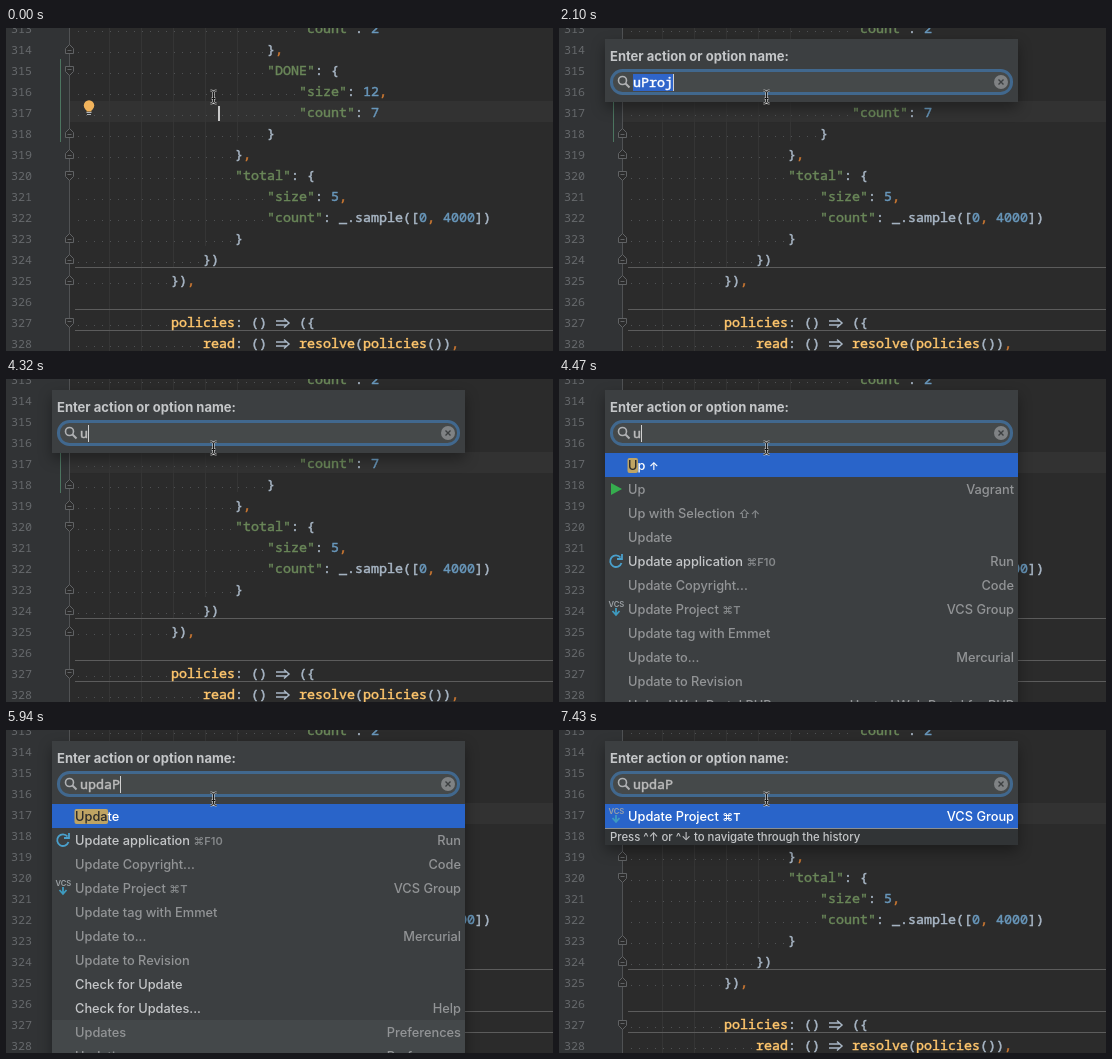
Animation of 547x323 px, one loop 8000 ms. Source, as an HTML page:

```html
<!DOCTYPE html>
<html lang="en">
<head>
<meta charset="utf-8">
<title>Find action</title>
<style>
html, body { margin: 0; width: 100%; height: 100%; overflow: hidden; background: #2b2b2b; }
svg { display: block; width: 547px; height: 323px; }
text { white-space: pre; font: 500 12.8px Inter, "Open Sans", sans-serif; fill: #c4c6c8; }
.code {
  font: 13.333px "Noto Sans Mono", "DejaVu Sans Mono", monospace;
  color: #a9b7c6; fill: currentColor; stroke: currentColor; stroke-width: .45px;
}
.code tspan { fill: currentColor; stroke: currentColor; }
.num { font: 11.67px "Noto Sans Mono", "DejaVu Sans Mono", monospace; fill: #66696c; }
.str { color: #6a8759; }
.val { color: #6897bb; }
.comma { color: #cc7832; }
.fn { color: #ffc66d; }
.title { font-size: 13px; font-weight: 700; }
.hint { font-size: 11.35px; }
.off { fill: #929496; }
.key { fill: #85888a; font-size: 11px; font-weight: 600; }
.sel, .sel .key { fill: #fff; }
.vcs { font-size: 7.6px; font-weight: 600; fill: #9da2a6; }
.popup { filter: drop-shadow(0 6px 7px rgba(0, 0, 0, .35)); }
</style>
</head>
<body>
<svg viewBox="0 0 547 323"><g id="editor"></g><g id="overlay"></g></svg>
<script>
const LOOP = 8000, COL = 8, CODE_X = 69, ROW = 21;
const $ = id => document.getElementById(id);
const rect = (x, y, w, h, fill, extra = '') =>
  `<rect x="${x}" y="${y}" width="${w}" height="${h}" fill="${fill}" ${extra}/>`;
const path = (d, stroke, width = 1, fill = 'none') =>
  `<path d="${d}" stroke="${stroke}" stroke-width="${width}" fill="${fill}"/>`;
const text = (x, y, s, cls = '', extra = '') =>
  `<text x="${x}" y="${y}" class="${cls}" ${extra}>${s}</text>`;
const span = (cls, s) => `<tspan class="${cls}">${s}</tspan>`;

// --- editor -------------------------------------------------------------
// [indent column, code, fold mark]; the first line is number 313
const lines = [
  [28, '"count": 2'],
  [24, '},', 'end'],
  [24, '"DONE": {', 'start'],
  [28, '"size": 12,'],
  [28, '"count": 7'],
  [24, '}', 'end'],
  [20, '},', 'end'],
  [20, '"total": {', 'start'],
  [24, '"size": 5,'],
  [24, '"count": _.sample([0, 4000])'],
  [20, '}', 'end'],
  [16, '})', 'end'],
  [12, '}),', 'end'],
  [0, ''],
  [12, 'policies: () => ({', 'start'],
  [16, 'read: () => resolve(policies()),'],
];

function paint(code) {
  return code.replace(/"\w+"|\d+|,|policies|read|resolve|=>/g, s =>
    s === '=>' ? '  ' :
    span(s[0] === '"' ? 'str' : s === ',' ? 'comma' : /\d/.test(s) ? 'val' : 'fn', s));
}

function foldMark(y, kind) {
  const d = kind === 'end' ? -1 : 1;
  return path(`M59.5 ${y + .5 - 4 * d}h8v${5 * d}l-4 ${4 * d}l-4 ${-4 * d}zM61.5 ${y + .5 - d}h4`, '#606264', 1, '#2b2b2b');
}

function drawEditor() {
  let out = rect(0, 0, 64, 323, '#313335') + rect(64, 73, 483, 21, '#323232');
  out += path('M103.5 0V323M135.5 0V323M167.5 0V239M199.5 0V218M231.5 0V113', '#353535');
  out += path('M63.5 0V323', '#505254') + rect(54, 31, 1, 83, '#4c7560');
  out += path('M69 239.5H547M69 281.5H547M69 302.5H547', '#5c5c5c');
  lines.forEach(([indent, code, fold], i) => {
    const mid = ROW * i, base = mid + 5, x = CODE_X + indent * COL;
    out += text(5, base, 313 + i, 'num');
    if (indent) out += `<path d="M${CODE_X + 3} ${mid + 3.5}H${x}" stroke="#505254" stroke-dasharray="1 7"/>`;
    out += text(x, base, paint(code), 'code');
    const arrow = code.indexOf('=>');
    if (arrow > 0) {
      const ax = x + arrow * COL;
      out += path(`M${ax + 1} ${mid - 1}h11M${ax + 1} ${mid + 3}h11M${ax + 9} ${mid - 3.5}l5 4.5l-5 4.5`, '#a9b7c6', 1.5);
    }
    if (fold) out += foldMark(mid, fold);
  });
  $('editor').innerHTML = out;
}

function bulb() {
  return '<circle cx="83" cy="77.5" r="5.2" fill="#f2b45c"/>' +
    rect(80.5, 81, 5, 2.5, '#f2b45c') + rect(80.5, 84, 5, 1, '#b0b4b8') + rect(81, 86, 4, 1, '#b0b4b8');
}

// --- popup --------------------------------------------------------------
const icons = {
  run: y => path(`M52 ${y - 6}l11 6l-11 6z`, 'none', 0, '#35ad4e'),
  reload: y => path(`M61.5 ${y - 3.5}A5.8 5.8 0 1 0 62.5 ${y + 2}M63 ${y - 7}v5h-5`, '#4aa0cc', 1.8),
  vcs: y => text(49.5, y - 2, 'VCS', 'vcs') + path(`M57 ${y - 1}v6M53.5 ${y + 2}l3.5 4l3.5 -4`, '#3e9bc0', 1.8),
};

const item = (name, group = '', opt = {}) => ({ name, group, ...opt });
const on = { on: true };
const project = item('Update Project', 'VCS Group', { icon: 'vcs', key: '⌘T' });
const common = [
  item('Update application', 'Run', { icon: 'reload', key: '⌘F10', on: true }),
  item('Update Copyright...', 'Code'),
  project,
  item('Update tag with Emmet'),
  item('Update to...', 'Mercurial'),
  item('Update to Revision'),
];
const results = {
  none: [],
  short: [project],
  up: [
    item('Up', '', { key: '↑' }),
    item('Up', 'Vagrant', { icon: 'run' }),
    item('Up with Selection', '', { key: '⇧↑' }),
    item('Update'),
    ...common,
    item('Upload Web Portal PHP app...', 'Hosted Web Portal for PHP'),
  ],
  update: [
    item('Update'),
    ...common,
    item('Check for Update', '', on),
    item('Check for Updates...', 'Help', on),
    item('Updates', 'Preferences', { setting: true }),
    item('Updating...', 'Preferences', { setting: true }),
  ],
};

const pen = document.createElement('canvas').getContext('2d');
function widthOf(s) {
  pen.font = '500 12.8px Inter, "Open Sans", sans-serif';
  return pen.measureText(s).width;
}

function drawItem(it, i, match) {
  const y = 86 + 24 * i, first = i === 0;
  const cls = first ? 'sel' : it.on ? '' : 'off';
  let out = '', name = it.name;
  if (first) out += rect(46, 74, 413, 24, '#2964c9');
  else if (it.setting) out += rect(46, y - 12, 413, 24, '#44484a');
  if (first && match) {
    const hit = name.slice(0, match);
    out += rect(68.5, 79, widthOf(hit) + 1, 15, '#bfa463', 'rx="2"');
    name = `<tspan fill="#2b2b2b">${hit}</tspan>${name.slice(match)}`;
  }
  if (it.icon) out += icons[it.icon](y);
  const key = it.key ? `<tspan class="key" dx="3.5">${it.key}</tspan>` : '';
  out += text(69, y + 5, name + key, cls);
  return out + text(455, y + 5, it.group, first ? 'sel' : 'off', 'text-anchor="end"');
}

function drawField(query, selected, caret) {
  let out = rect(52.5, 42.5, 400, 23, '#45494a', 'rx="11" stroke="#41688e" stroke-width="3"');
  out += '<circle cx="63.5" cy="52.5" r="4" fill="none" stroke="#afb1b3" stroke-width="1.6"/>' +
    path('M66.5 55.5l4 4', '#afb1b3', 2);
  if (selected) out += rect(74, 46, query.length * COL, 17, '#2f65ca');
  out += text(74, 59, query, 'code', `style="color:${selected ? '#fff' : '#bbb'}"`);
  if (query) out += '<circle cx="442" cy="54" r="7" fill="#7f8284"/>' + path('M439.5 51.5l5 5m0 -5l-5 5', '#3c3f41', 1.4);
  if (caret) out += rect(74 + query.length * COL, 46, 1, 17, '#d0d0d0');
  return out;
}

function drawPopup(query, list, match, caret, selected) {
  const rows = results[list], short = list === 'short';
  const height = short ? 104 : rows.length ? 330 : 63;
  let out = `<g class="popup">${rect(46, 11, 413, height, '#3c3f41')}</g>`;
  out += text(51, 33, 'Enter action or option name:', 'title') + drawField(query, selected, caret);
  if (short) out += rect(46, 98, 413, 17, '#313436') + rect(46, 98, 413, 1, '#8c8f91') +
    text(51, 111, 'Press ^↑ or ^↓ to navigate through the history', 'hint');
  return out + rows.map((it, i) => drawItem(it, i, match)).join('');
}

// --- pointer ------------------------------------------------------------
function pointer(arrow) {
  if (arrow) return path('M206.5 67v15.5l3.7 -3.4l2.6 6l2.4 -1l-2.6 -5.9h4.4z', '#fff', 1.1, '#000');
  const beam = 'M204.5 62.5q3 0 3 2.5v8q0 2.5 -3 2.5M210.5 62.5q-3 0 -3 2.5v8q0 2.5 3 2.5M205.5 70.5h4';
  return path(beam, '#d4d4d4', 2.2) + path(beam, '#161616', 1);
}

// --- timeline -----------------------------------------------------------
const OPEN = 2100, TYPE = 3430;
const queries = [[OPEN, 'uProj'], [TYPE, ''], [4320, 'u'], [4610, 'up'], [5050, 'upd'], [5200, 'upda'], [5940, 'updaP']];
// [time, result list, highlighted letters]
const lists = [
  [OPEN, 'none', 0], [2250, 'short', 0], [TYPE, 'none', 0], [4470, 'up', 1],
  [4760, 'up', 2], [5050, 'update', 3], [5200, 'update', 4], [6090, 'short', 0],
];
const caretOff = [[150, 600], [1050, 1650], [2540, 3140], [3880, 4320], [5650, 5940], [6530, 6980], [7430, LOOP]];
const arrowOn = [[150, OPEN], [5650, 5940]];
const latest = (steps, t) => steps.filter(s => s[0] <= t).pop().slice(1);
const within = (spans, t) => spans.some(([a, b]) => t >= a && t < b);

function overlay(t) {
  const caret = !within(caretOff, t);
  const scene = t < OPEN
    ? bulb() + (caret ? rect(212, 78, 2, 15, '#c8c8c8') : '')
    : drawPopup(...latest(queries, t), ...latest(lists, t), caret, t < TYPE);
  return scene + pointer(within(arrowOn, t));
}

let shown = '';
function tick(now) {
  const next = overlay(Math.max(0, now - start) % LOOP);
  if (next !== shown) $('overlay').innerHTML = shown = next;
  requestAnimationFrame(tick);
}

drawEditor();
const start = performance.now();
tick(start);
</script>
</body>
</html>
```
